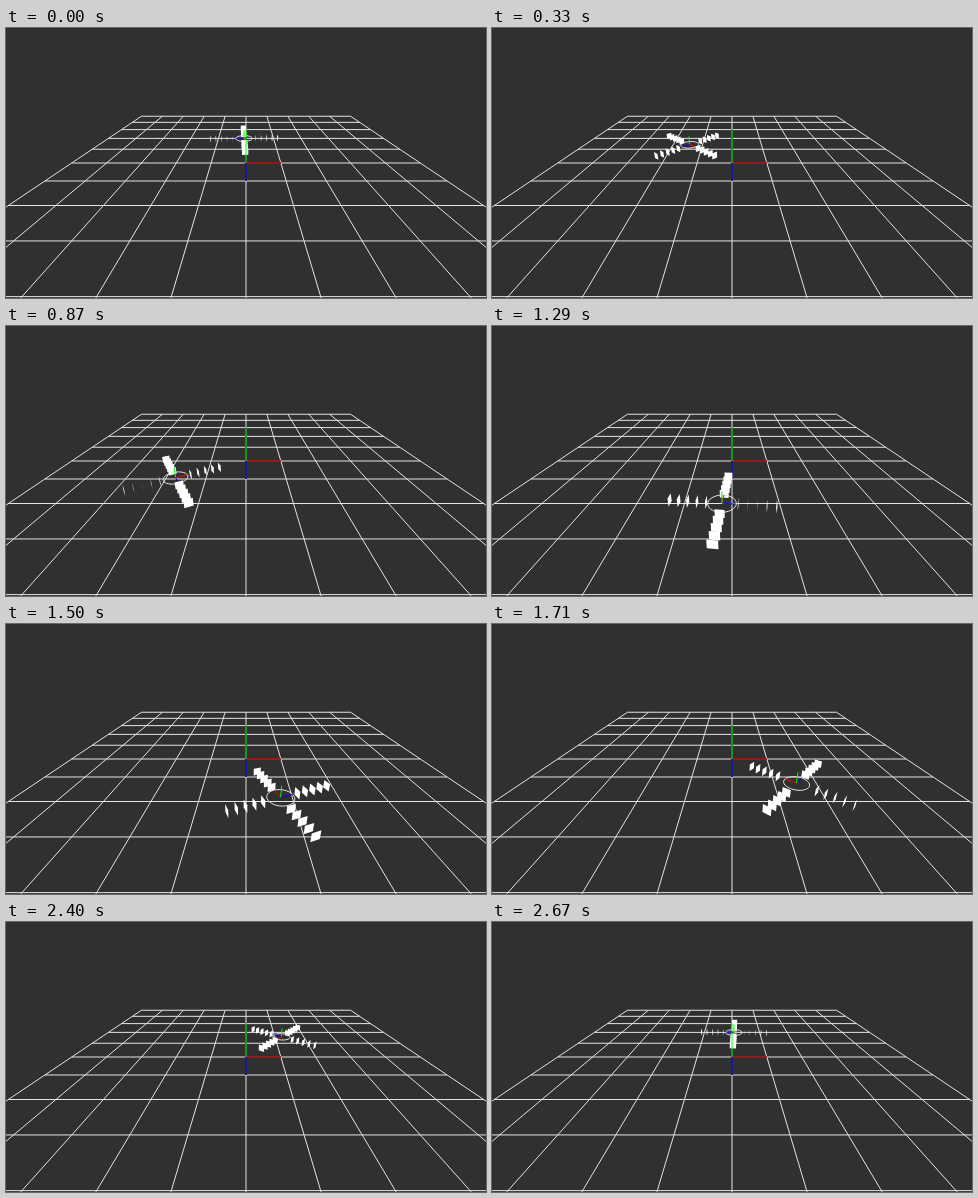
An HTML page with a canvas that plays this animation: 480 px wide and 270 px high, repeating every 2700 ms.

```html
<!DOCTYPE html>
<html lang="en">
<head>
<meta charset="utf-8">
<title>Orbiting rotor</title>
<style>
  html, body { margin: 0; height: 100%; overflow: hidden; background: #303030; }
  canvas { display: block; }
</style>
</head>
<body>
<canvas id="stage" width="480" height="270"></canvas>
<script>
const ctx = document.getElementById('stage').getContext('2d');
const TICK = 30, TICKS = 90;
const WIDTH = 480, HEIGHT = 270;
const FOCAL = HEIGHT / 2 / Math.tan(Math.PI / 6); // 60 degree field of view
const ROOT5 = Math.sqrt(5), DISTANCE = 3 * ROOT5; // camera at (0, 3, 6), aimed at the origin
const ORBIT = 2, RING = 0.3, HALF = 0.1, GAP = 0.2;
const ARMS = [[1, 0], [-1, 0], [0, 1], [0, -1]];
const BACKGROUND = '#303030', GRID = '#e4e4e4';
const AXIS_COLORS = ['#f00', '#0f0', '#00f'];

function project([x, y, z]) {
  const depth = DISTANCE - (y + 2 * z) / ROOT5;
  const scale = FOCAL / depth;
  return [WIDTH / 2 + x * scale, HEIGHT / 2 - (2 * y - z) / ROOT5 * scale, depth];
}

function trace(points) {
  ctx.beginPath();
  for (const [x, y] of points) ctx.lineTo(x, y);
}

function line(points, color, width = 1) {
  trace(points);
  ctx.strokeStyle = color;
  ctx.lineWidth = width;
  ctx.stroke();
}

// Start and end of each axis on screen
function axes(toScreen, size) {
  return AXIS_COLORS.map((color, i) => {
    const tip = [0, 0, 0];
    tip[i] = size;
    return { points: [toScreen([0, 0, 0]), toScreen(tip)], color };
  });
}

const worldAxes = axes(project, 1);

function drawGrid() {
  for (let i = -5; i <= 5; i++) {
    line([[i, 0, -5], [i, 0, 5]].map(project), GRID);
    line([[-5, 0, i], [5, 0, i]].map(project), GRID);
  }
  // The axes replace the grid lines they lie on
  for (const { points } of worldAxes) line(points, BACKGROUND, 2);
}

function draw(tick) {
  const angle = (tick * 4 + 2) * Math.PI / 180;
  const sin = Math.sin(angle), cos = Math.cos(angle);
  // Rotor space: inward, up, forward along the orbit
  const place = ([inward, up, forward]) => {
    const r = ORBIT - inward;
    return project([-r * sin - forward * cos, up, -r * cos + forward * sin]);
  };
  const items = [...worldAxes, ...axes(place, RING)];

  const rim = a => place([RING * Math.cos(a), 0, RING * Math.sin(a)]);
  const step = Math.PI / 16;
  for (let i = 0; i < 32; i++) {
    items.push({ points: [rim(i * step), rim((i + 1) * step)], color: GRID });
  }

  // Plates slide outwards and wrap after one gap
  const first = 0.34 + (tick + 2) % 5 * GAP / 5;
  for (const [a, b] of ARMS) {
    for (let i = 0; i < 5; i++) {
      const reach = first + i * GAP;
      const corner = (u, v) => place([a * reach + b * u, v, b * reach + a * u]);
      const points = [corner(-HALF, -HALF), corner(HALF, -HALF), corner(HALF, HALF), corner(-HALF, HALF)];
      items.push({ points, color: '#fff', filled: true });
    }
  }

  ctx.clearRect(0, 0, WIDTH, HEIGHT);
  drawGrid();
  const depth = ({ points }) => points.reduce((sum, p) => sum + p[2], 0) / points.length;
  items.sort((p, q) => depth(q) - depth(p));
  for (const { points, color, filled } of items) {
    if (filled) {
      trace(points);
      ctx.fillStyle = color;
      ctx.fill();
    } else {
      line(points, color);
    }
  }
}

const start = performance.now();
function frame() {
  draw(Math.floor((performance.now() - start) / TICK) % TICKS);
  requestAnimationFrame(frame);
}
frame();
</script>
</body>
</html>
```
